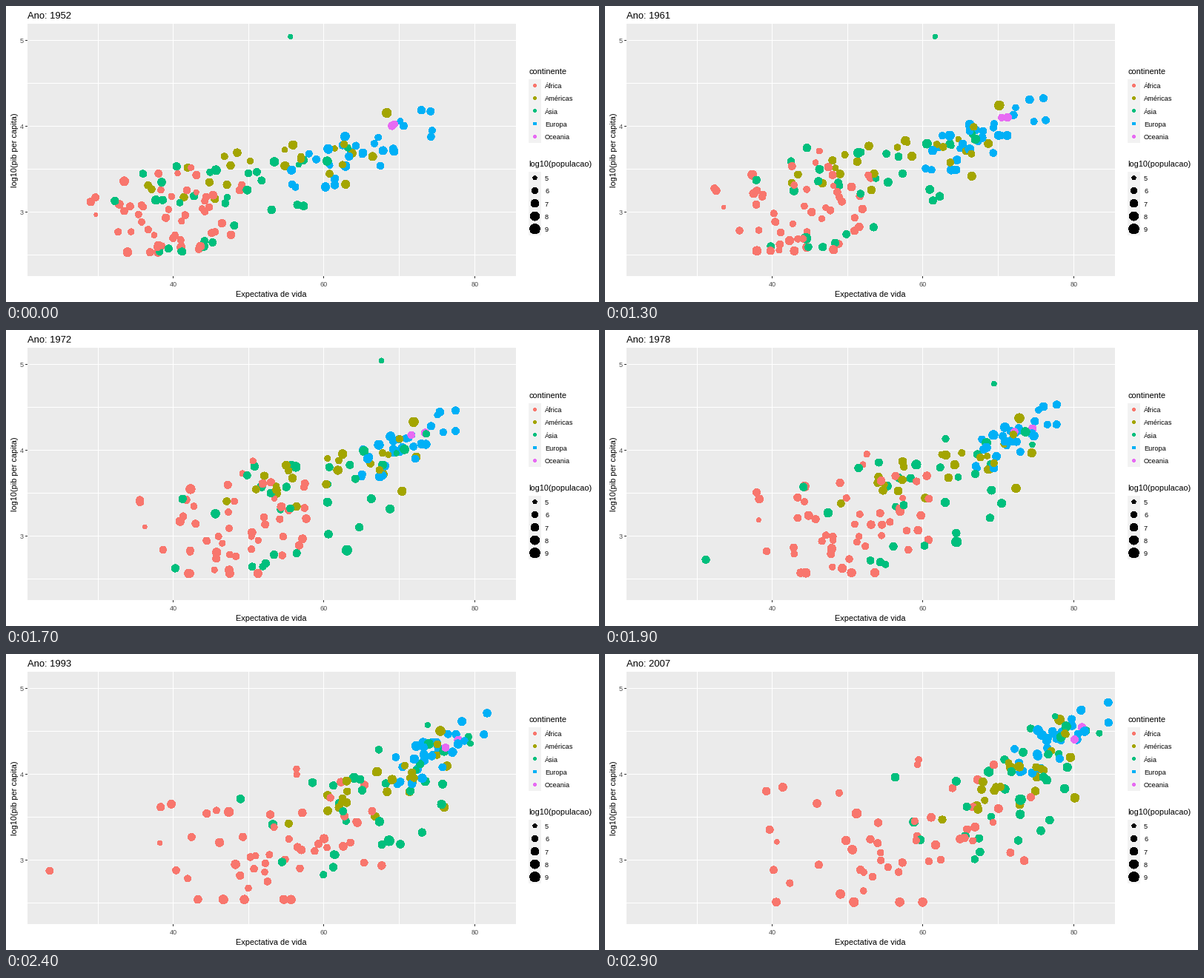
Recreate the animation shown at these times as a matplotlib script. Size 800 by 400 pixels, loop 4000 ms.

```python
import numpy as np
import matplotlib.pyplot as plt
from matplotlib.animation import FuncAnimation
from matplotlib.patches import Rectangle

W, H = 800, 400
PX = 0.72  # points per pixel at 100 dpi
LEFT, RIGHT, TOP, BOTTOM = 29, 688, 24, 365
FIRST, LAST, STEPS, PAUSE = 1952, 2007, 19, 10
CORAL, OLIVE, GREEN, BLUE, PINK = "#F8766D", "#A3A500", "#00BF7D", "#00B0F6", "#E76BF3"

# Surveys come every five years and snap to the nearest step
surveys = np.arange(FIRST, LAST + 1, 5)
progress = (surveys - FIRST) / (LAST - FIRST)
survey_steps = np.rint(progress * STEPS)

rng = np.random.default_rng(7)
groups = []  # (colours, life by survey, income by survey, population)


def scores(n):
    return np.clip(rng.normal(size=n), -1.6, 1.6) * 1.15


def drift(n):
    """Standard scores that turn slowly into new ones, with a little noise per survey."""
    turn = 0.6 * progress[:, None]
    noise = rng.normal(scale=0.08, size=(len(surveys), n))
    return np.cos(turn) * scores(n) + np.sin(turn) * scores(n) + noise


def crowd(color, n, link, pop, start, middle, end):
    """Scatter n dots; each key holds mean life, mean income and their spreads."""
    keys = zip(start, middle, end)
    mean_x, mean_y, sd_x, sd_y = (
        np.interp(surveys, (1952, 1977, 2007), k)[:, None] for k in keys)
    zx = drift(n)
    zy = np.clip(link * zx + np.sqrt(1 - link ** 2) * drift(n), -1.75, 2.2)
    pops = np.clip(rng.normal(pop, 0.55, n), 4.8, 8)
    groups.append(([color] * n, mean_x + sd_x * zx, mean_y + sd_y * zy, pops))


def single(color, pop, path):
    """Add one dot that stands out, led through a few key years."""
    years = list(path)
    life, income = (np.interp(surveys, years, v)[:, None] for v in zip(*path.values()))
    groups.append(([color], life, income, np.array([pop])))


crowd(CORAL, 51, 0.3, 6.5, (39, 3.0, 5.2, 0.27), (49.5, 3.18, 6.4, 0.35), (55, 3.24, 9.3, 0.42))
crowd(OLIVE, 24, 0.55, 6.6, (53, 3.5, 8.8, 0.2), (64, 3.76, 6.6, 0.22), (73.5, 3.92, 4.2, 0.26))
crowd(GREEN, 30, 0.65, 6.8, (46.5, 3.2, 8.5, 0.38), (60, 3.54, 8.5, 0.5), (71, 3.86, 6.6, 0.5))
crowd(BLUE, 30, 0.8, 6.8, (65, 3.69, 5, 0.23), (72, 4.12, 2.7, 0.19), (77.7, 4.37, 2.8, 0.23))

single(PINK, 6.9, {1952: (69.1, 4.0), 2007: (81.2, 4.54)})
single(PINK, 6.3, {1952: (69.4, 4.02), 1977: (72.2, 4.21), 2007: (80.2, 4.4)})
single(OLIVE, 8.2, {1952: (68.4, 4.15), 2007: (78.2, 4.63)})
single(GREEN, 5.2, {1952: (55.6, 5.04), 1972: (67.7, 5.04), 1982: (71.3, 4.5), 2007: (77.6, 4.67)})
single(GREEN, 8.7, {1952: (44, 2.6), 1957: (50.5, 2.76), 1962: (44.5, 2.69),
                    1972: (63.1, 2.83), 1992: (68.7, 3.22), 2007: (73, 3.7)})
single(GREEN, 6.7, {1952: (39.4, 2.57), 1972: (40.3, 2.62), 1977: (31.2, 2.72),
                    1982: (51, 2.8), 2007: (59.7, 3.23)})
single(CORAL, 6.4, {1952: (40, 2.69), 1987: (44, 2.93), 1992: (23.6, 2.87), 2007: (46.2, 2.94)})

# Mix the continents so that no colour always lies on top
colors, lives, incomes, pops = (np.concatenate(g, axis=-1) for g in zip(*groups))
order = rng.permutation(len(colors))
colors, pops = colors[order], pops[order]
lives, incomes = lives[:, order], incomes[:, order]


def to_x(life):
    return 28.92 + (life - 20.649) * (RIGHT - LEFT) / 64.904


def to_y(income):
    return TOP + (5.189 - income) * (BOTTOM - TOP) / 2.94


def area(size):
    return (0.75 * (size * 2.845 + 0.945) * PX) ** 2


def pop_area(pop):
    return area(1 + 5 * np.sqrt(np.clip((pop - 4.78) / 4.34, 0, None)))


fig = plt.figure(figsize=(W / 100, H / 100), dpi=100, facecolor="white")
ax = fig.add_axes((0, 0, 1, 1))
ax.set(xlim=(0, W), ylim=(H, 0))
ax.axis("off")


def box(x, y, w, h, color):
    ax.add_patch(Rectangle((x, y), w, h, fc=color, lw=0, antialiased=False, zorder=1))


def label(x, y, s, size, color="black", **kw):
    kw.setdefault("va", "baseline")
    return ax.text(x, y, s, fontsize=size * PX, color=color,
                   family="Liberation Sans", **kw)


def points(x, y, s, c):
    return ax.scatter(x, y, s=s, c=c, lw=0, antialiased=False, zorder=3)


# Panel, grid and axes
box(LEFT, TOP, RIGHT - LEFT, BOTTOM - TOP, "#EBEBEB")
for life in range(30, 81, 10):
    x = round(to_x(life))
    box(x, TOP, 1, BOTTOM - TOP, "white")
    if life % 20 == 0:
        box(x, BOTTOM, 1, 3, "#333333")
        label(x + 0.5, 379, str(life), 9.2, "#4D4D4D", ha="center")
for income in np.arange(2.5, 5.1, 0.5):
    y = round(to_y(income))
    box(LEFT, y, RIGHT - LEFT, 1, "white")
    if income % 1 == 0:
        box(LEFT - 3, y, 3, 1, "#333333")
        label(24, y + 4, f"{income:.0f}", 9.2, "#4D4D4D", ha="right")
label(358, 393, "Expectativa de vida", 11, ha="center")
label(12, 195, "log10(pib per capita)", 11, ha="center", va="center", rotation=90)
title = label(29, 17, "", 13)


def legend(heading, y, names, colors, areas):
    label(705, y, heading, 11)
    rows = y + 15.2 + 17.28 * np.arange(5)
    box(705, round(rows[0] - 8.6), 17, 86, "#F2F2F2")
    points([713.5] * 5, rows, areas, colors)
    for name, row in zip(names, rows):
        label(727, round(row) + 4, name, 9.2)


legend("continente", 92, ("África", "Américas", "Ásia", "Europa", "Oceania"),
       (CORAL, OLIVE, GREEN, BLUE, PINK), area(1.5))
sizes = np.arange(5, 10)
legend("log10(populacao)", 217, sizes, ["black"] * 5, pop_area(sizes))

cloud = points(to_x(lives[0]), to_y(incomes[0]), pop_area(pops), colors)


def draw(frame):
    step = min(max(frame - PAUSE, 0), STEPS)
    at = np.interp(step, survey_steps, np.arange(len(surveys)))
    i = min(int(at), len(surveys) - 2)
    life, income = (v[i] + (at - i) * (v[i + 1] - v[i]) for v in (lives, incomes))
    cloud.set_offsets(np.column_stack([to_x(life), to_y(income)]))
    cloud.set_sizes(pop_area(pops + 0.35 * at / (len(surveys) - 1)))
    title.set_text(f"Ano: {round(FIRST + (LAST - FIRST) * step / STEPS)}")
    return cloud, title


anim = FuncAnimation(fig, draw, frames=40, interval=100, repeat=True, repeat_delay=0)
plt.show()
```
